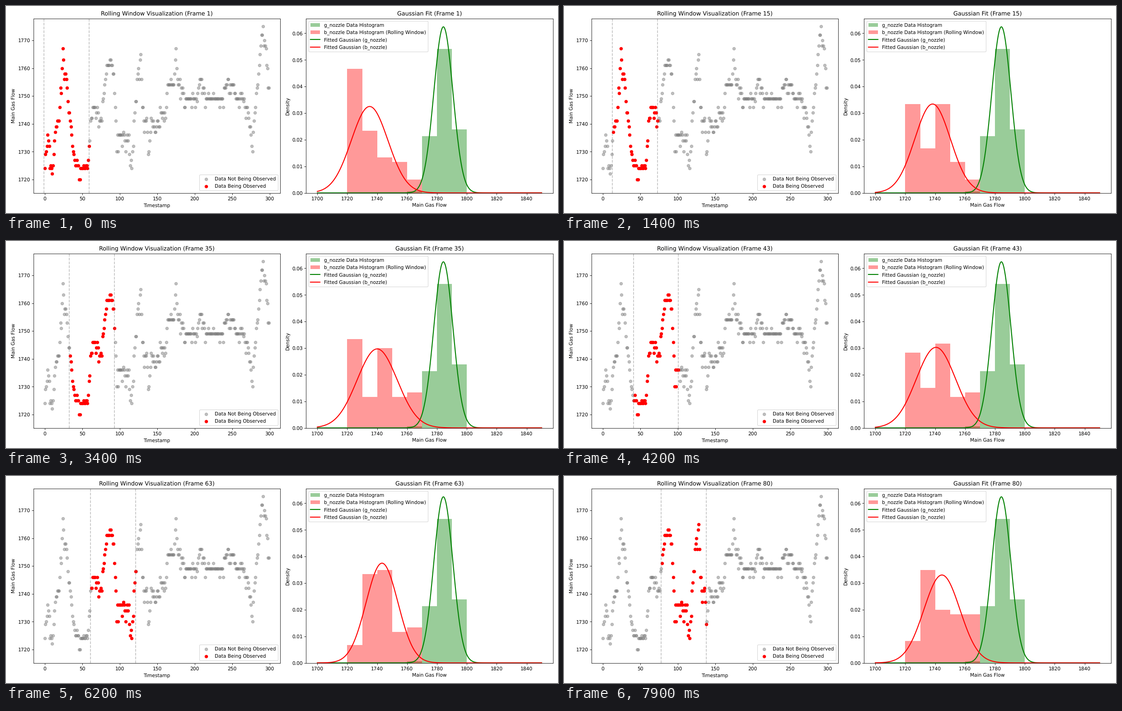
A matplotlib script for the animation above (8000 ms loop, 1222 px wide and 458 px high).

```python
import numpy as np
import matplotlib.pyplot as plt
from matplotlib.animation import FuncAnimation

W, H = 1222, 458
DPI = W / 16
FRAMES, INTERVAL = 80, 100
SAMPLES, WINDOW = 300, 60
BASE, STEP = 1718.37, 1.72  # sensor offset and resolution

# Turning points of the gas flow: (timestamp, flow above 1700)
TREND = [
    (0, 24), (4, 34), (10, 21), (14, 38), (19, 41), (24, 64), (28, 57), (32, 45),
    (38, 30), (41, 25), (57, 23), (61, 41), (67, 46), (74, 40), (83, 61), (88, 63),
    (92, 57), (96, 34), (102, 36), (112, 33), (114, 25), (117, 29), (119, 41),
    (124, 57), (128, 64), (130, 50), (132, 41), (136, 40), (139, 29), (143, 45),
    (147, 37), (155, 45), (159, 41), (164, 54), (172, 54), (175, 67), (178, 55),
    (186, 50), (202, 49), (208, 57), (215, 49), (238, 49), (242, 55), (251, 54),
    (255, 49), (264, 49), (273, 42), (276, 32), (280, 42), (290, 75), (294, 69),
    (299, 52),
]

plt.rcParams["text.hinting"] = "none"


def make_flow(t):
    """Trend with jitter, rounded to whole sensor steps."""
    rng = np.random.default_rng(4)
    trend = 1700 + np.interp(t, *zip(*TREND))
    steps = np.round((trend - BASE) / STEP) + rng.choice([-2, 0, 0, 0, 0, 1], t.size)
    return np.clip(np.round(BASE + STEP * steps), 1718, 1775)


def gaussian(x, mean, std):
    return np.exp(-0.5 * ((x - mean) / std) ** 2) / (std * np.sqrt(2 * np.pi))


time = np.arange(SAMPLES)
flow = make_flow(time)
points = np.column_stack([time, flow])
edges = np.arange(1700, 1851, 10)
grid = np.linspace(1700, 1850, 1000)

fig, (ax_flow, ax_fit) = plt.subplots(1, 2, figsize=(W / DPI, H / DPI), dpi=DPI)

rest = ax_flow.scatter(time, flow, color="gray", alpha=0.5,
                       label="Data Not Being Observed")
seen = ax_flow.scatter(time, flow, color="red", label="Data Being Observed")
bounds = [ax_flow.axvline(0, color="gray", linestyle="--", alpha=0.5)
          for _ in range(2)]
ax_flow.set(xlim=(-14.95, 313.95), ylim=(1715.15, 1777.85),
            xlabel="Timestamp", ylabel="Main Gas Flow")
ax_flow.legend(loc="lower right")
flow_title = ax_flow.set_title("Rolling Window Visualization (Frame 1)")

good = gaussian(grid, 1784.3, 6.39)
ax_fit.bar([1760, 1770, 1780, 1790], [0.0006, 0.0213, 0.0541, 0.0238], width=10,
           align="edge", color="green", alpha=0.4, label="g_nozzle Data Histogram")
bars = ax_fit.bar(edges[:-1], np.zeros(edges.size - 1), width=10, align="edge",
                  color="red", alpha=0.4,
                  label="b_nozzle Data Histogram (Rolling Window)")
good_line, = ax_fit.plot(grid, good, color="green", lw=2,
                         label="Fitted Gaussian (g_nozzle)")
fit, = ax_fit.plot(grid, good, color="red", lw=2, label="Fitted Gaussian (b_nozzle)")
ax_fit.set(xlim=(1692.5, 1857.5), ylim=(0, good.max() * 1.05),
           xlabel="Main Gas Flow", ylabel="Density")
ax_fit.legend(handles=[*ax_fit.containers, good_line, fit], loc="upper left")
fit_title = ax_fit.set_title("Gaussian Fit (Frame 1)")

fig.tight_layout()


def update(i):
    inside = (time >= i) & (time < i + WINDOW)
    seen.set_offsets(points[inside])
    rest.set_offsets(points[~inside])
    for line, x in zip(bounds, (i - 1, i + WINDOW - 1)):
        line.set_xdata([x, x])

    window = flow[inside]
    density, _ = np.histogram(window, bins=edges, density=True)
    for bar, height in zip(bars, density):
        bar.set_height(height)
    fit.set_ydata(gaussian(grid, window.mean(), window.std()))

    flow_title.set_text(f"Rolling Window Visualization (Frame {i + 1})")
    fit_title.set_text(f"Gaussian Fit (Frame {i + 1})")
    return [seen, rest, fit, flow_title, fit_title, *bounds, *bars]


anim = FuncAnimation(fig, update, frames=FRAMES, interval=INTERVAL,
                     repeat=True, repeat_delay=0, blit=False)
plt.show()
```
